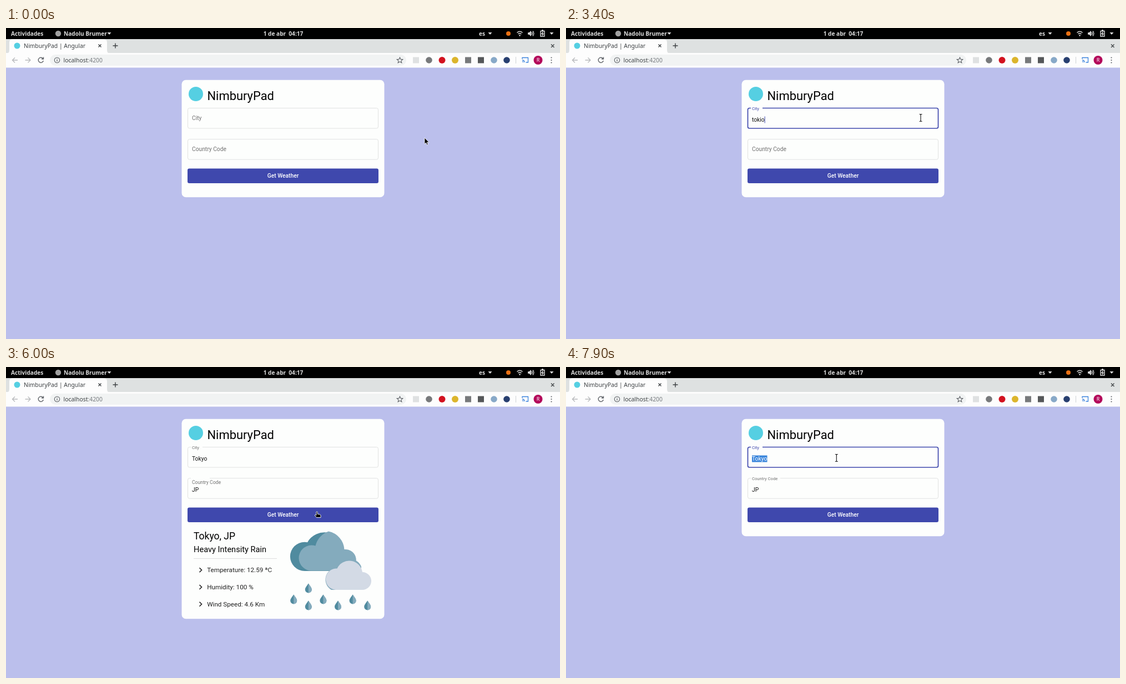
An HTML page for the animation above (8000 ms loop, 998 by 561 pixels).

```html
<!DOCTYPE html>
<html lang="es">
<head>
<meta charset="utf-8">
<title>NimburyPad</title>
<style>
  html, body { margin: 0; width: 100%; height: 100%; overflow: hidden; background: #bbbfec; }
  svg { display: block; width: 998px; height: 561px; }
  text { font: 10.25px Roboto, sans-serif; white-space: pre; }
  .bar text { font: 600 10.1px "Noto Sans", sans-serif; fill: #dcdcdc; }
  .chrome text { font: 10.4px "Noto Sans", sans-serif; fill: #3c4043; }
  .line { fill: none; stroke: #5f6368; stroke-width: 1.4; }
  .label { fill: #707070; }
  .box { fill: none; }
  .item text { font-size: 11.7px; fill: #212121; }
</style>
</head>
<body>
<svg viewBox="0 0 998 561">
  <defs>
    <clipPath id="buttonClip"><rect x="327" y="253.5" width="344" height="26.5" rx="3"/></clipPath>
    <clipPath id="trackClip"><rect x="327" y="294.3" width="344" height="3"/></clipPath>
    <g id="drop">
      <path d="M0-8.5C-3-4-6-1-6 2.5A6 6 0 0 0 6 2.5C6-1 3-4 0-8.5Z" fill="#508b9f"/>
      <path d="M0-8.5V8.5A6 6 0 0 0 6 2.5C6-1 3-4 0-8.5Z" fill="#84abbd"/>
    </g>
  </defs>

  <rect width="998" height="561" fill="#bbbfec"/>

  <g class="bar">
    <rect width="998" height="20"/>
    <text x="9" y="13.6">Actividades</text>
    <circle cx="94" cy="10" r="5.2" fill="#a0a0a0"/>
    <text x="104" y="13.6">Nadolu Brumer</text>
    <text x="499.5" y="13.6" text-anchor="middle">1 de abr&#160; 04:17</text>
    <text x="852" y="13.6">es</text>
    <path d="M182.500 8h7l-3.500 4zM868.500 8h7l-3.500 4zM979.500 8h7l-3.500 4z" fill="#dcdcdc"/>
    <circle cx="905" cy="10" r="4" fill="#ea7012"/>
    <g fill="none" stroke="#dcdcdc" stroke-width="1.4">
      <path d="M920.500 8.500q5-4.500 10 0M922.500 11q3-2.500 6 0"/>
      <path d="M940.500 8.500h2l3-3v9l-3-3h-2z" fill="#dcdcdc" stroke-width=".8"/>
      <path d="M947 7.500q2 2.500 0 5M949 5.500q3.500 4.500 0 9"/>
      <path d="M963 5.500h7v9.500h-7zM965 4h3M967.500 7l-2.500 3.500h3l-2 3"/>
    </g>
    <circle cx="925.500" cy="13.500" r="1.3" fill="#dcdcdc"/>
  </g>

  <g class="chrome">
    <rect y="20" width="998" height="26" fill="#dee1e1"/>
    <path d="M0 46q6 0 6-6V26q0-6 6-6H176q6 0 6 6V40q0 6 6 6z" fill="#fdfdfd"/>
    <circle cx="20" cy="32" r="5.5" fill="#55cfe2"/>
    <text x="32" y="35.8">NimburyPad | Angular</text>
    <rect y="45" width="998" height="26.500" fill="#fdfdfd"/>
    <rect x="79" y="48" width="642" height="20" rx="10" fill="#f1f3f3"/>
    <text x="103.500" y="61.500">localhost<tspan fill="#777b7f">:4200</tspan></text>
    <g class="line">
      <path d="M166.500 29.500l5 5m0-5l-5 5M192.500 32h9m-4.500-4.500v9M982 29.500l5.500 5.500m0-5.500l-5.500 5.500" stroke="#3c4043"/>
      <path d="M21 58H11.500m4.500-4.500L11.500 58l4.500 4.500M34.500 58H44m-4.500-4.500L44 58l-4.500 4.500" stroke="#b9bbbd"/>
      <path d="M66.500 55A4.600 4.600 0 1 0 67.300 59M67.500 52.500v3.500H64"/>
      <circle cx="92" cy="58" r="4.700" stroke-width="1.100"/>
      <path d="M92 57v3.500M92 55v1.100" stroke-width="1.200"/>
      <path d="M709.500 53l1.500 3.400 3.800.3-2.900 2.400.9 3.700-3.300-2-3.300 2 .9-3.700-2.900-2.400 3.800-.3z" stroke-width="1.100"/>
      <path d="M930 56v-2.500h10.500v8.500h-4M930 58q4 0 4 4M930 60.300q1.700 0 1.700 1.700" stroke="#3b82dd" stroke-width="1.300"/>
      <path d="M918.500 52v12" stroke="#cfd2d6" stroke-width="1"/>
    </g>
    <rect x="733" y="52.500" width="11" height="11" fill="#dfe1e2"/>
    <circle cx="762" cy="58" r="5.800" fill="#77797b"/>
    <circle cx="785.500" cy="58" r="6" fill="#d2111f"/>
    <circle cx="809" cy="58" r="6" fill="#dcb52c"/>
    <rect x="827" y="52.500" width="11" height="11" fill="#77797b"/>
    <rect x="850" y="52.500" width="11" height="11" fill="#555759"/>
    <circle cx="879" cy="58" r="5.800" fill="#88a9c8"/>
    <circle cx="902" cy="58" r="5.800" fill="#283f70"/>
    <circle cx="958.500" cy="58" r="8" fill="#b3085a"/>
    <text x="958.500" y="61.300" text-anchor="middle" style="font-size:9px;fill:#fff">R</text>
    <path d="M982.500 53.500v.01m0 4.490v.01m0 4.490v.01" stroke="#5f6368" stroke-width="2.200" stroke-linecap="round"/>
  </g>

  <rect id="card" x="316.500" y="93.700" width="365" rx="7.500" fill="#fdfefd"/>
  <circle cx="342" cy="119" r="13" fill="#55cfe2"/>
  <text x="362.500" y="130" style="font-size:21.900px">NimburyPad</text>

  <g id="city"></g>
  <g id="country"></g>

  <g clip-path="url(#buttonClip)">
    <rect x="327" y="253" width="344" height="28" fill="#3f48ad"/>
    <circle id="ripple" cx="560" cy="264" fill="#fff"/>
  </g>
  <text x="499" y="270.200" text-anchor="middle" fill="#fff" style="font-weight:500">Get Weather</text>

  <g id="progress" clip-path="url(#trackClip)">
    <rect x="327" y="294" width="344" height="4" fill="#c7c8e5"/>
    <rect id="fill" y="294" height="4" fill="#3f48ad"/>
  </g>

  <g id="result">
    <text x="338" y="311.300" style="font-size:17.500px">Tokyo, JP</text>
    <text x="338" y="333.800" style="font-size:14.600px">Heavy Intensity Rain</text>
    <path d="M338 345.500H488" stroke="#dedede"/>
    <g class="item" id="items"></g>
    <path d="M538 368a26 26 0 0 1 0-52.300q3 0 5 .5A35.500 35.500 0 0 1 609 329V368z" fill="#508b9f"/>
    <path d="M551 367.500a23 23 0 0 1-1-46q4 0 7.500 1A36 36 0 0 1 581 296.500 35.500 35.500 0 0 1 609.500 329a19 19 0 0 1 4 38.500z" fill="#84abbd"/>
    <path d="M586 402a21.500 21.500 0 0 1 11-40A23 23 0 0 1 640 360V402z" fill="#84abbd"/>
    <path d="M594 402a19 19 0 0 1 2.500-38.500A24 24 0 0 1 642 370a16 16 0 0 1 0 32z" fill="#d3dae5"/>
    <g id="rain"></g>
  </g>

  <g id="pointer" stroke-linejoin="round">
    <path id="arrow" d="M0 0V11.300L2.600 9l1.900 4 1.800-.8-1.800-3.900H8z" stroke="#fff" stroke-width=".8"/>
    <g id="ibeam" fill="none">
      <path d="M-2.500-6.500H-1L0-5.500 1-6.500H2.500M0-5.500V5.500M-2.500 6.500H-1L0 5.500 1 6.500H2.500" stroke="#fff" stroke-width="2.600"/>
      <path d="M-2.500-6.500H-1L0-5.500 1-6.500H2.500M0-5.500V5.500M-2.500 6.500H-1L0 5.500 1 6.500H2.500" stroke="#222" stroke-width="1.200"/>
    </g>
    <path id="hand" d="M-1 .5Q.2-.8 1.300.5V4.200L5.500 5Q7 5.500 7 7V10.500H-.5L-3.500 7Q-4 5.500-2.500 5.500L-1 6.500z" stroke="#fff" stroke-width=".9"/>
  </g>
</svg>

<script>
const LOOP = 8000;
const FOCUS = 2300, BLUR = 4700, PRESS = 5300, LOADING = 5340, RESULT = 5900, REFOCUS = 7100, SELECT = 7300;
const KEYS = [2500, 2700, 2900, 3100, 3300];
const MOVES = [
  // start, end, x, y
  [0, 0, 754, 198], [1500, 2200, 639, 162], [4000, 4600, 574, 290.5],
  [5000, 5250, 560, 261], [6300, 6750, 487.3, 164]
];

const $ = id => document.getElementById(id);
const clamp = v => Math.min(1, Math.max(0, v));
const span = (t, start, length) => clamp((t - start) / length);
const smooth = p => p * p * (3 - 2 * p);
const easeOut = p => 1 - (1 - p) ** 3;
const show = (id, on) => $(id).setAttribute('visibility', on ? 'visible' : 'hidden');
function set(el, attrs) {
  for (const key in attrs) el.setAttribute(key, attrs[key]);
}

function makeField(id, label, top, notch) {
  const group = $(id);
  group.innerHTML = `
    <rect class="box" x="327.5" y="${top}" width="343" height="36.5" rx="3"/>
    <rect class="notch" x="333" y="${top - 2}" height="4" fill="#fdfefd"/>
    <text class="label">${label}</text>
    <rect class="mark" x="335" y="${top + 15}" width="27.500" height="12" fill="#3c87dc"/>
    <text class="value" x="335" y="${top + 24.2}"></text>
    <path class="caret" stroke="#3f48ad"/>`;
  const part = name => group.querySelector('.' + name);
  const [box, gap, text, mark, value, caret] =
    ['box', 'notch', 'label', 'mark', 'value', 'caret'].map(part);

  return {
    contains: (x, y) => x > 327 && x < 671 && y > top && y < top + 37,
    draw({ content, float, focused, hovered, selected, caretOn }) {
      set(box, {
        stroke: focused ? '#3f48ad' : hovered ? '#303034' : '#e1e2e2',
        'stroke-width': focused || hovered ? 1.7 : 1
      });
      gap.setAttribute('width', notch * float);
      set(text, {
        transform: `translate(335 ${top + 21.2 - 17.8 * float}) scale(${1 - 0.25 * float})`,
        style: focused ? 'fill:#3f48ad' : ''
      });
      value.textContent = content;
      value.setAttribute('fill', selected ? '#fff' : '#111');
      mark.setAttribute('visibility', selected ? 'visible' : 'hidden');
      caret.setAttribute('visibility', caretOn ? 'visible' : 'hidden');
      if (caretOn) {
        const x = 335.5 + value.getComputedTextLength();
        caret.setAttribute('d', `M${x} ${top + 15}v12`);
      }
    }
  };
}

const city = makeField('city', 'City', 144.5, 21);
const country = makeField('country', 'Country Code', 200.7, 53);

$('items').innerHTML = ['Temperature: 12.59 ªC', 'Humidity: 100 %', 'Wind Speed: 4.6 Km'].map((line, i) => {
  const y = 370.3 + i * 30.7;
  return `<path d="M348.500 ${y - 8}l4 4-4 4" fill="none" stroke="#222" stroke-width="1.600"/>
    <text x="362.200" y="${y}">${line}</text>`;
}).join('');

$('rain').innerHTML = [[0, 419], [1, 399], [1, 430], [2, 419], [3, 430], [4, 419], [5, 430]]
  .map(([column, y]) => `<use href="#drop" x="${518.2 + column * 26.6}" y="${y}"/>`).join('');

function pointerAt(t) {
  let [, , x, y] = MOVES[0];
  for (const [start, end, toX, toY] of MOVES.slice(1)) {
    const p = smooth(span(t, start, end - start));
    x += (toX - x) * p;
    y += (toY - y) * p;
  }
  return [x, y];
}

function drawPointer(x, y, overField) {
  const overButton = x > 327 && x < 671 && y > 253 && y < 280;
  $('pointer').setAttribute('transform', `translate(${x} ${y})`);
  show('arrow', !overField && !overButton);
  show('ibeam', overField);
  show('hand', overButton);
}

function drawRequest(t) {
  const loading = t >= LOADING && t < RESULT;
  const hasResult = t >= RESULT && t < REFOCUS;
  $('card').setAttribute('height', hasResult ? 360.5 : loading ? 229 : 211.5);
  show('progress', loading);
  show('result', hasResult);

  const elapsed = Math.max(0, t - LOADING);
  const center = -0.049 + 0.3765 * (elapsed / 500) ** 1.5;
  const width = 0.08 + 0.377 * clamp(elapsed / 383) ** 1.4;
  set($('fill'), { x: 327 + 344 * (center - width / 2), width: 344 * width });

  set($('ripple'), {
    r: 234 * easeOut(span(t, PRESS, 240)),
    opacity: 0.1 * (1 - span(t, PRESS + 225, 400))
  });
}

function draw(t) {
  const [x, y] = pointerAt(t);
  const onCity = city.contains(x, y), onCountry = country.contains(x, y);
  const answered = t >= RESULT;
  const typed = KEYS.filter(key => t >= key);
  const focused = t >= FOCUS && t < BLUR || t >= REFOCUS;
  const selected = t >= SELECT;
  const lastInput = t >= REFOCUS ? REFOCUS : typed.at(-1) ?? FOCUS;

  city.draw({
    content: answered ? 'Tokyo' : 'tokio'.slice(0, typed.length),
    float: easeOut(span(t, FOCUS, 350)),
    hovered: onCity,
    caretOn: focused && !selected && (t - lastInput) % 1000 < 500,
    focused, selected
  });
  country.draw({
    content: answered ? 'JP' : '',
    float: easeOut(span(t, RESULT, 350)),
    hovered: onCountry
  });
  drawRequest(t);
  drawPointer(x, y, onCity || onCountry);
}

function tick() {
  draw(performance.now() % LOOP);
  requestAnimationFrame(tick);
}
tick();
</script>
</body>
</html>
```
